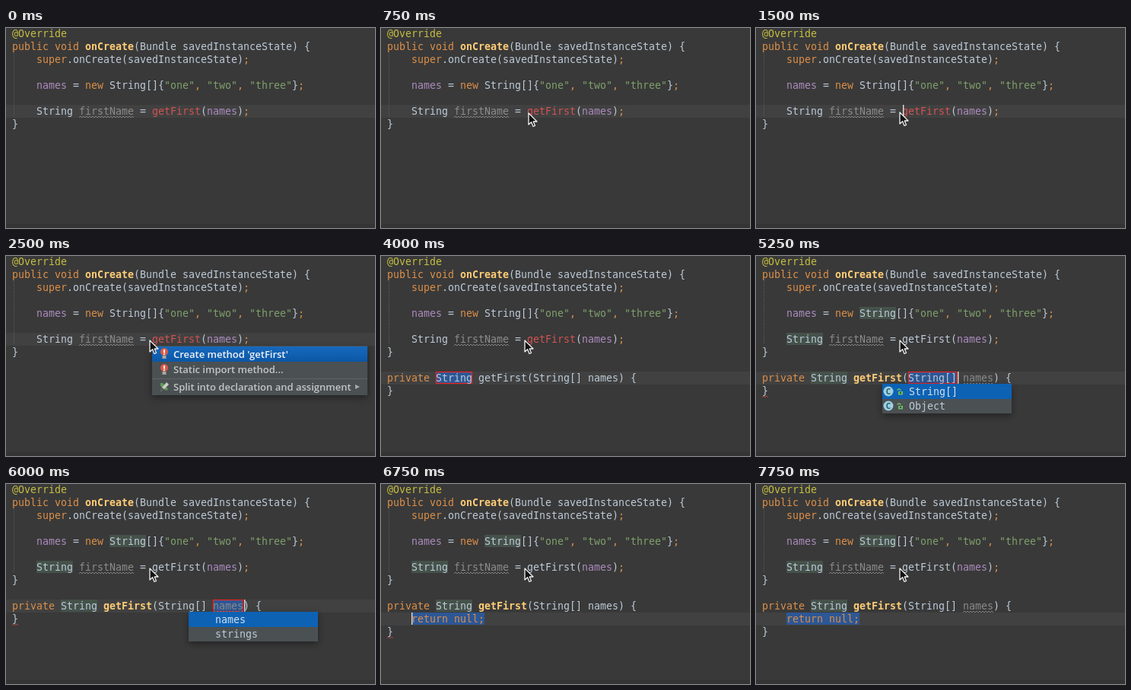
An HTML page with a canvas that plays this animation: 485 by 263 pixels, repeating every 8000 ms.

```html
<!DOCTYPE html>
<html lang="en">
<head>
<meta charset="utf-8">
<title>Create method from usage</title>
<style>
html, body { margin: 0; width: 100%; height: 100%; overflow: hidden; background: #393939; }
canvas { display: block; width: 485px; height: 263px; }
</style>
</head>
<body>
<canvas id="stage"></canvas>
<script>
const W = 485, H = 263, LOOP = 8000;
const LEFT = 8, COL = 8, ROW = 17, TOP = -1;
const MONO = '"DejaVu Sans Mono", monospace';
const SANS = '"Open Sans", sans-serif';
const C = {
  bg: '#393939', line: '#414141', text: '#bccad8', key: '#dc8f49', note: '#c5be42',
  decl: '#ffcd76', field: '#ab8bbd', str: '#7fa06b', bad: '#d25252', dim: '#8b8b8b',
  select: '#2d5795', usage: '#45524a', frame: '#f02222', menu: '#4b5052', pick: '#0d62b4'
};

const canvas = document.getElementById('stage');
const g = canvas.getContext('2d');
const scale = window.devicePixelRatio || 1;
canvas.width = W * scale;
canvas.height = H * scale;

const xOf = col => LEFT + col * COL;
const yOf = row => TOP + row * ROW;

function rect(x, y, w, h, color) {
  g.fillStyle = color;
  g.fillRect(x, y, w, h);
}

function text(s, x, y, color, font) {
  g.font = font;
  g.fillStyle = color;
  g.fillText(s, x, y);
}

function path(points, fill, stroke, width = 1) {
  g.beginPath();
  points.forEach(([x, y], i) => i ? g.lineTo(x, y) : g.moveTo(x, y));
  if (fill) { g.closePath(); g.fillStyle = fill; g.fill(); }
  if (stroke) { g.strokeStyle = stroke; g.lineWidth = width; g.stroke(); }
}

function disc(x, y, r, color) {
  g.beginPath();
  g.arc(x, y, r, 0, Math.PI * 2);
  g.fillStyle = color;
  g.fill();
}

// Parts are [string, colour name]; decl is set in bold.
function code(row, col, ...parts) {
  for (const [s, kind = 'text'] of parts) {
    text(s, xOf(col), yOf(row) + 13, C[kind], (kind === 'decl' ? 'bold ' : '') + '13.29px ' + MONO);
    col += s.length;
  }
}

function mark(row, col, n, color) {
  rect(xOf(col), yOf(row), n * COL, ROW - 1, color);
}

function wave(row, col, n, color) {
  const x = xOf(col), y = yOf(row) + 15;
  const points = [];
  for (let i = 0; i <= n * COL; i += 2) points.push([x + i, y + (i % 4 ? 0 : 2)]);
  path(points, null, color, 0.9);
}

function slot(row, col, n) {
  mark(row, col, n, C.select);
  g.strokeStyle = C.frame;
  g.lineWidth = 1.2;
  g.strokeRect(xOf(col) + 0.5, yOf(row) + 0.5, n * COL - 1, ROW - 2);
}

function caret(row, col) {
  rect(xOf(col) + (col === 4 ? 0 : 1), yOf(row), 1.4, ROW - 1, '#dedede');
}

function panel(x, y, w, h) {
  g.save();
  g.shadowColor = 'rgba(0,0,0,.4)';
  g.shadowBlur = 9 * scale;
  g.shadowOffsetY = 3 * scale;
  rect(x, y, w, h, C.menu);
  g.restore();
}

function bulb(x, y) {
  disc(x, y - 2, 5, '#dd5b49');
  rect(x - 2.5, y + 3, 5, 4, '#aaa79e');
  rect(x - 1, y - 5, 2, 4.5, '#fff');
  rect(x - 1, y + 0.5, 2, 1.5, '#fff');
}

function pencil(x, y) {
  path([[x - 5, y - 5], [x - 2, y - 5], [x + 5, y + 3], [x + 3, y + 5], [x - 5, y - 1]], '#5f9c57');
  path([[x - 5, y + 6], [x - 3, y + 1], [x + 3, y - 6], [x + 6, y - 3], [x, y + 3]], '#c9cdc5');
  path([[x - 3, y + 1], [x, y + 3], [x - 5, y + 6]], '#4c584a');
}

function actionMenu() {
  const font = '600 13px ' + SANS;
  panel(192, 118, 283, 65);
  const blue = g.createLinearGradient(0, 119, 0, 139);
  blue.addColorStop(0, '#1769bd');
  blue.addColorStop(1, '#0b57a6');
  rect(192, 119, 283, 20, blue);
  bulb(208, 128);
  bulb(208, 149);
  pencil(208, 172);
  text("Create method 'getFirst'", 220, 134, '#f0f3f6', font);
  text('Static import method...', 220, 154, '#c3c6c8', font);
  rect(192, 161, 283, 1, '#606466');
  text('Split into declaration and assignment', 220, 177, '#c3c6c8', font);
  path([[459, 169], [465, 172], [459, 175]], '#a5a9ab');
}

function classIcon(x, y) {
  disc(x, y, 6.5, '#9bd0e2');
  text('C', x - 3.3, y + 3.7, '#2c5968', 'bold 10px ' + SANS);
  g.strokeStyle = '#6db86a';
  g.lineWidth = 1.3;
  g.beginPath();
  g.arc(x + 14, y - 1, 2, Math.PI, 0);
  g.stroke();
  rect(x + 13, y, 6, 4.5, '#6db86a');
  rect(x + 15, y + 1, 2, 2, '#315637');
}

function suggestions(x, items, icons) {
  panel(x, 168, 170, 39);
  rect(x, 168, 170, 20, C.pick);
  items.forEach((s, i) => {
    const y = 178 + i * 19;
    if (icons) classIcon(x + 8, y);
    text(s, x + 35, y + 5, i ? C.text : '#d3dfe9', '13.29px ' + MONO);
  });
}

function pointer(t) {
  if (t < 250) return;
  const [x, y] = t < 500 ? [261, 96] : t < 750 ? [196, 113] : t < 1000 ? [193, 111] : [188, 110];
  g.save();
  g.translate(x + 1, y + 1);
  g.lineJoin = 'round';
  path([[0, 0], [0, 15], [3.6, 11.8], [6, 17.5], [8.5, 16.4], [6.2, 11], [11, 11], [0, 0]],
    '#111', '#f1f1f1', 1.3);
  g.restore();
}

function draw(t) {
  const made = t >= 4000, checked = t >= 4500, body = t >= 6750;
  const typing = t >= 5250 && t < 6000, naming = t >= 6000 && !body;

  g.setTransform(scale, 0, 0, scale, 0, 0);
  rect(0, 0, W, H, C.bg);
  rect(0, 258, W, 5, '#343434');
  rect(0, yOf(body ? 10 : made ? 9 : 6), W, ROW, C.line);
  for (let y = 33; y < 117; y += 3) rect(10, y, 1, 1.5, '#595b5b');

  if (checked) {
    mark(4, 16, 6, C.usage);
    mark(6, 4, 6, C.usage);
    mark(9, 8, 6, C.usage);
    if (t < 5250) mark(9, 24, 6, C.usage);
  }
  if (made && t < 5250) slot(9, 8, 6);
  if (typing) slot(9, 24, 8);
  if (naming) slot(9, 33, 5);
  if (body) mark(10, 4, 12, C.select);

  code(0, 0, ['@Override', 'note']);
  code(1, 0, ['public void ', 'key'], ['onCreate', 'decl'], ['(Bundle savedInstanceState) {']);
  code(2, 4, ['super', 'key'], ['.onCreate(savedInstanceState)'], [';', 'key']);
  code(4, 4, ['names', 'field'], [' = '], ['new ', 'key'], ['String[]{'], ['"one"', 'str'],
    [', ', 'key'], ['"two"', 'str'], [', ', 'key'], ['"three"', 'str'], ['}'], [';', 'key']);
  code(6, 4, ['String '], ['firstName', 'dim'], [' = '], ['getFirst', checked ? 'text' : 'bad'],
    ['('], ['names', 'field'], [')'], [';', 'key']);
  wave(6, 11, 9, C.dim);
  code(7, 0, ['}']);

  if (made) {
    const unused = checked && !body || t >= 7250;
    code(9, 0, ['private ', 'key'], ['String '], ['getFirst', checked ? 'decl' : 'text'],
      ['(String[] '], ['names', unused ? 'dim' : 'text'], [') {']);
    if (unused) wave(9, 33, 5, C.dim);
    if (body) code(10, 4, ['return null;', 'key']);
    const end = body ? 11 : 10;
    code(end, 0, ['}']);
    if (checked && t < 7250) wave(end, 0, 1, '#b84a45');
  }

  if (t >= 1500 && t < 2500) caret(6, 23);
  if (t >= 4250 && t < 5250) caret(9, 14);
  if (typing) caret(9, 32);
  if (naming) caret(9, 38);
  if (body && t < 7750) caret(10, 4);

  if (t >= 2500 && !made) actionMenu();
  if (typing) suggestions(166, ['String[]', 'Object'], true);
  if (naming) suggestions(240, ['names', 'strings'], false);
  pointer(t);
}

const start = performance.now();
function tick() {
  draw((performance.now() - start) % LOOP);
  requestAnimationFrame(tick);
}
tick();
</script>
</body>
</html>
```
